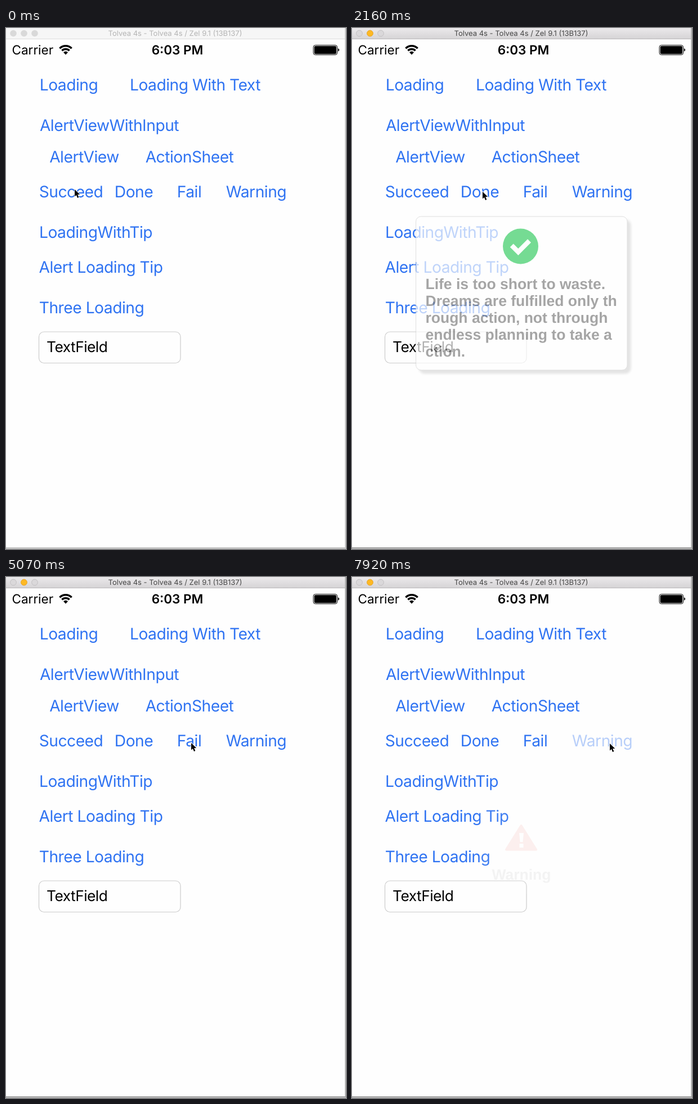
Recreate the animation shown at these times as an HTML page. Size 604 px wide and 926 px high, loop 8000 ms.

```html
<!DOCTYPE html>
<html lang="en">
<head>
<meta charset="utf-8">
<title>Alert demo</title>
<style>
html, body { margin: 0; width: 100%; height: 100%; overflow: hidden; background: #fefefe; }
svg { display: block; width: 604px; height: 926px; }
text { font-family: Inter, "Open Sans", sans-serif; text-rendering: geometricPrecision; }

.links text { font-size: 28.2px; letter-spacing: -.017em; fill: #2f73f2; text-anchor: middle; }
.status { font-size: 22.5px; }
.title { font-size: 13px; text-anchor: middle; }
.note { font: bold 26.5px "Liberation Sans", Arial, sans-serif; fill: #808080; }
.note text { font: inherit; }
.mid { text-anchor: middle; }
.card { fill: #fefefe; stroke: #d2d2d2; filter: drop-shadow(6px 6px 2px rgba(0, 0, 0, .15)); }

/* Every change is a hard step on one shared 8 s clock. */
.active, .inactive, .panel, .press, #cursor { animation: 8s step-end infinite; }
.active { animation-name: focus; }
.inactive { animation-name: blur; }
#succeed { animation-name: press-succeed; }
#done { animation-name: press-done; }
#fail { animation-name: press-fail; }
#warning { animation-name: press-warning; }
#succeed-panel { animation-name: show-succeed; }
#done-panel { animation-name: show-done; }
#error-panel { animation-name: show-error; }
#warning-panel { animation-name: show-warning; }
#cursor { animation-name: move; }

@keyframes focus { 0% { opacity: 0 } 1.25%, 100% { opacity: 1 } }
@keyframes blur { 0% { opacity: 1 } 1.25%, 100% { opacity: 0 } }

@keyframes press-succeed {
  0% { opacity: 1 } 2.5% { opacity: .22 } 4.75% { opacity: .42 }
  5.875% { opacity: .76 } 7% { opacity: .95 } 8.125%, 100% { opacity: 1 }
}
@keyframes press-done {
  0% { opacity: 1 } 33.625% { opacity: .22 } 35.75% { opacity: .36 }
  36.875% { opacity: .7 } 38% { opacity: .93 } 39%, 100% { opacity: 1 }
}
@keyframes press-fail {
  0% { opacity: 1 } 65.625% { opacity: .22 } 69% { opacity: .36 }
  70.125% { opacity: .7 } 71.125% { opacity: .93 } 72.25%, 100% { opacity: 1 }
}
@keyframes press-warning {
  0% { opacity: 1 } 96.75% { opacity: .22 } 99%, 100% { opacity: .34 }
}

@keyframes show-succeed {
  0% { opacity: 0 } 4.75% { opacity: .2 } 5.875% { opacity: .69 } 7% { opacity: .94 }
  8.125% { opacity: 1 } 27% { opacity: .7 } 28.125% { opacity: .25 } 29.125%, 100% { opacity: 0 }
}
@keyframes show-done {
  0% { opacity: 0 } 35.75% { opacity: .12 } 36.875% { opacity: .52 } 38% { opacity: .88 }
  39% { opacity: 1 } 57.875% { opacity: .7 } 59% { opacity: .25 } 60.125%, 100% { opacity: 0 }
}
@keyframes show-error {
  0% { opacity: 0 } 69% { opacity: .12 } 70.125% { opacity: .52 } 71.125% { opacity: .88 }
  72.25% { opacity: 1 } 91.375% { opacity: .7 } 92.375% { opacity: .25 } 93.5%, 100% { opacity: 0 }
}
@keyframes show-warning { 0% { opacity: 0 } 99%, 100% { opacity: .08 } }

@keyframes move {
  0% { transform: translate(122px, 287px) }
  1.25% { transform: translate(122px, 290px) }
  11.5% { transform: translate(140px, 292px) }
  12.625% { transform: translate(190px, 293px) }
  13.75% { transform: translate(236px, 292px) }
  14.75% { transform: translate(251px, 291px) }
  19.25% { transform: translate(242px, 290px) }
  20.375% { transform: translate(235px, 290px) }
  22.625% { transform: translate(233px, 291px) }
  23.75% { transform: translate(232px, 291px) }
  38% { transform: translate(246px, 288px) }
  39% { transform: translate(282px, 284px) }
  40.125% { transform: translate(313px, 283px) }
  44.625% { transform: translate(322px, 288px) }
  45.75% { transform: translate(331px, 295px) }
  46.75% { transform: translate(335px, 297px) }
  49% { transform: translate(333px, 296px) }
  50.125% { transform: translate(331px, 295px) }
  63.375% { transform: translate(329px, 295px) }
  70.125% { transform: translate(362px, 291px) }
  71.125% { transform: translate(425px, 293px) }
  72.25% { transform: translate(461px, 296px) }
  89.125% { transform: translate(460px, 296px) }
  90.25%, 100% { transform: translate(458px, 296px) }
}
</style>
</head>
<body>
<svg viewBox="0 0 604 926">
  <defs>
    <linearGradient id="bar" x2="0" y2="1">
      <stop stop-color="#ebe9eb"/><stop offset="1" stop-color="#d5d3d5"/>
    </linearGradient>
    <linearGradient id="edge" x2="0" y2="1">
      <stop stop-color="#929292"/><stop offset="1" stop-color="#c4c4c4"/>
    </linearGradient>
  </defs>
  <rect width="604" height="926" fill="#fefefe"/>

  <!-- window frame -->
  <g class="inactive">
    <rect width="603" height="20" fill="#f6f6f6"/>
    <path d="M0 19.5H603" stroke="#dcdcdc"/>
    <g fill="#d9d9d9">
      <circle cx="13" cy="9.5" r="5.8"/><circle cx="32" cy="9.5" r="5.8"/><circle cx="51" cy="9.5" r="5.8"/>
    </g>
    <text class="title" x="300.5" y="14" fill="#b4b4b4">Tolvea 4s - Tolvea 4s / Zel 9.1 (13B137)</text>
    <path d="M603 0V924" stroke="#c8c8c8" stroke-width="2"/>
    <rect y="923" width="604" height="3" fill="#c2c2c2"/>
  </g>
  <g class="active">
    <rect width="603" height="20" fill="url(#bar)"/>
    <path d="M0 19.5H603" stroke="#b9b7b9"/>
    <g fill="#dad8da" stroke="#c3c1c3">
      <circle cx="13" cy="9.5" r="5.4"/><circle cx="51" cy="9.5" r="5.4"/>
      <circle cx="32" cy="9.5" r="5.4" fill="#fdb924" stroke="#e6a42a"/>
    </g>
    <text class="title" x="300.5" y="14" fill="#464646">Tolvea 4s - Tolvea 4s / Zel 9.1 (13B137)</text>
    <path d="M603 0V924" stroke="#b4b4b4" stroke-width="2"/>
    <rect y="923" width="604" height="3" fill="url(#edge)"/>
  </g>

  <!-- status bar -->
  <text class="status" x="10.5" y="47">Carrier</text>
  <g fill="none" stroke="#000" stroke-width="3.5">
    <path d="M95.4 36.2A15 15 0 0 1 116.6 36.2"/>
    <path d="M99.4 40.2A9.3 9.3 0 0 1 112.6 40.2"/>
  </g>
  <path d="M106 47.5L102 43.3A5.6 5.6 0 0 1 110 43.3Z"/>
  <text class="status mid" x="304.5" y="47" font-weight="600">6:03 PM</text>
  <rect x="546" y="30.5" width="42.5" height="17.2" rx="3.6" fill="none" stroke="#000"/>
  <rect x="547.6" y="32" width="39.3" height="14.2" rx="2.2"/>
  <path d="M589.8 36.3Q592 36.6 592 39T589.8 41.7Z"/>

  <!-- buttons -->
  <g class="links">
    <text x="111.5" y="111">Loading</text>
    <text x="336" y="111">Loading With Text</text>
    <text x="183.5" y="182.5">AlertViewWithInput</text>
    <text x="139" y="239">AlertView</text>
    <text x="326" y="239">ActionSheet</text>
    <text class="press" id="succeed" x="115.5" y="301">Succeed</text>
    <text class="press" id="done" x="227" y="301">Done</text>
    <text class="press" id="fail" x="325.5" y="301">Fail</text>
    <text class="press" id="warning" x="444.5" y="301">Warning</text>
    <text x="159.5" y="372.5">LoadingWithTip</text>
    <text x="168.5" y="435">Alert Loading Tip</text>
    <text x="152" y="506.5">Three Loading</text>
  </g>
  <rect x="58.5" y="540" width="251.5" height="55.5" rx="9" fill="#fefefe" stroke="#cbcbcb" stroke-width="1.2"/>
  <text x="72" y="576" font-size="26.3" letter-spacing="-.5">TextField</text>

  <!-- alerts -->
  <g class="panel" id="succeed-panel">
    <rect class="card" x="113.5" y="335" width="375.5" height="273" rx="9"/>
    <circle cx="299.5" cy="388" r="31.5" fill="#3bcd66"/>
    <path d="M283.7 386.5L295.3 398L315 378.3" fill="none" stroke="#fff" stroke-width="8.4"/>
    <g class="note">
      <text x="130.5" y="463.5">Life is too short to waste.</text>
      <text x="130.5" y="493.6">Dreams are fulfilled only th</text>
      <text x="130.5" y="523.7">rough action, not through</text>
      <text x="130.5" y="553.8">endless planning to take a</text>
      <text x="130.5" y="583.9">ction.</text>
    </g>
  </g>

  <g class="panel" id="done-panel">
    <rect class="card" x="226.5" y="410.5" width="149.5" height="152.5" rx="8"/>
    <g fill="none" stroke="#35b99b" stroke-width="5">
      <path d="M288 435.5H322.5V486.5H276.5V447Z" stroke-linejoin="round"/>
      <path d="M276 447H289V435" stroke-width="4"/>
      <path d="M286 457L299.5 473L332 446" stroke="#fefefe" stroke-width="12"/>
      <path d="M288 460L299.5 473L328 449" stroke-width="6"/>
    </g>
    <text class="note mid" x="301" y="538">Done</text>
  </g>

  <g class="panel" id="error-panel">
    <rect class="card" x="226.5" y="410.5" width="149.5" height="152.5" rx="8"/>
    <circle cx="299.5" cy="463.5" r="31.5" fill="#e48900"/>
    <path d="M289.5 453.5L309.5 473.5M309.5 453.5L289.5 473.5" stroke="#fff" stroke-width="8.6"/>
    <text class="note mid" x="301" y="538">Error</text>
  </g>

  <g class="panel" id="warning-panel">
    <rect x="226.5" y="410.5" width="149.5" height="152.5" rx="8" fill="#fefefe"/>
    <path d="M300.5 442L327 484.5H274Z" fill="#e74c3c" stroke="#e74c3c" stroke-width="4" stroke-linejoin="round"/>
    <path d="M297 455H305L303.5 471H298.5ZM297.5 474H304.5V481H297.5Z" fill="#fff"/>
    <text class="note mid" x="301" y="538">Warning</text>
  </g>

  <path id="cursor" d="M0 0V12.6L2.9 9.9L5 14.9L7.3 13.9L5.2 9H9.2Z" stroke="#fff" stroke-width="1.6" paint-order="stroke"/>
</svg>
</body>
</html>
```
